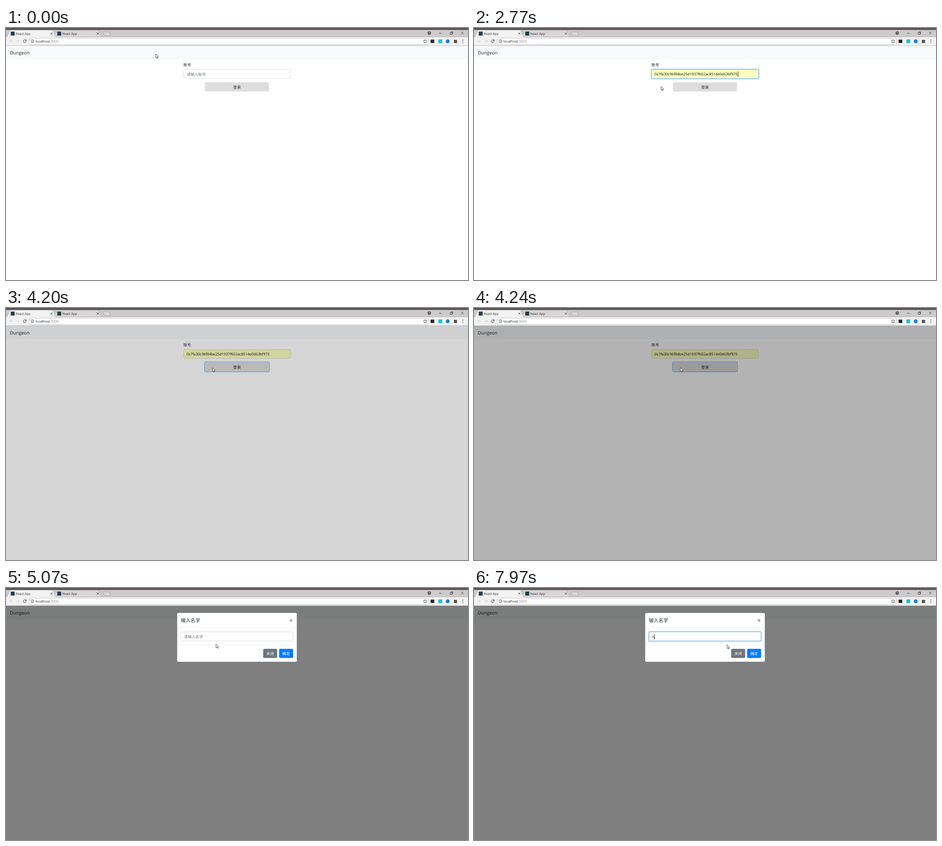
Write an HTML page that moves like this. It is 1013x553 px and loops after 8000 ms.

```html
<!DOCTYPE html>
<html lang="zh">
<head>
<meta charset="utf-8">
<title>React App</title>
<style>
  html, body { margin: 0; width: 100%; height: 100%; overflow: hidden; background: #fff; }
  svg { display: block; width: 1013px; height: 553px; }
  text { font-family: "Open Sans", "Noto Sans CJK SC", "Noto Sans CJK", sans-serif; font-size: 8.44px; fill: #212529; text-rendering: geometricPrecision; white-space: pre; }
  .tab { font-size: 6.8px; fill: #222; }
  .code { font-size: 7.95px; fill: #111; }
  .hint { fill: #6c757d; }
  .mid { text-anchor: middle; }
  .line { fill: none; stroke: #333; stroke-width: 1; }
  .field { fill: #fff; stroke: #ced4da; stroke-width: .8; }
  .ring { fill: none; stroke: #007bff; stroke-opacity: .27; stroke-width: 1.8; }
  .edge { fill: none; stroke: #80bdff; stroke-width: .9; }
</style>
</head>
<body>
<svg viewBox="0 0 1013 553">
  <!-- page -->
  <rect width="1013" height="553" fill="#fff"/>
  <rect y="39" width="1013" height="29.5" fill="#f8f9fa"/>
  <text x="8.4" y="58" style="font-size:10.1px">Dungeon</text>
  <text x="389" y="83.7">账号</text>
  <rect id="account" class="field" x="389.5" y="91.2" width="234.5" height="19.4" rx="2"/>
  <g id="accountFocus">
    <rect class="ring" x="388.3" y="90" width="236.9" height="21.8" rx="3"/>
    <rect class="edge" x="389.5" y="91.2" width="234.5" height="19.4" rx="2"/>
  </g>
  <text id="accountHint" class="hint" x="396" y="104.7">请输入账号</text>
  <text id="address" class="code" x="395.7" y="104.3">0x7fa30c96f84be25d1937f602ac8514e0d63bf975</text>
  <rect id="accountCaret" y="95.5" width="1" height="11.5" fill="#222"/>
  <rect x="436.2" y="119.2" width="140.5" height="20" rx="2" fill="#ddd"/>
  <rect id="loginFocus" x="435.3" y="118.3" width="142.3" height="21.8" rx="3" fill="none" stroke="#9cc6f7" stroke-width="1.6"/>
  <text class="mid" x="506.5" y="132.8">登录</text>

  <rect id="shade" y="39" width="1013" height="514"/>

  <g id="dialog">
    <rect x="375.2" y="54.5" width="262.6" height="107.5" rx="2.5" fill="#fff" stroke="#000" stroke-opacity=".2" stroke-width=".6"/>
    <text x="383.5" y="75" style="font-size:10.55px">输入名字</text>
    <path d="M622.6 68.6l4.8 4.8m0-4.8l-4.8 4.8" stroke="#777" stroke-width="1.4"/>
    <path d="M375.5 87.2h262M375.5 124.6h262" stroke="#e9ecef" stroke-width=".8"/>
    <rect class="field" x="383.9" y="96.4" width="245.4" height="19.7" rx="2"/>
    <g id="nameFocus">
      <rect class="ring" x="382.7" y="95.2" width="247.8" height="22.1" rx="3"/>
      <rect class="edge" x="383.9" y="96.4" width="245.4" height="19.7" rx="2"/>
    </g>
    <text id="nameHint" class="hint" x="390.3" y="109.8">请输入名字</text>
    <text id="name" class="code" x="390.4" y="109.6" style="fill:#495057">A</text>
    <rect id="nameCaret" y="101" width="1" height="11" fill="#333"/>
    <rect x="564" y="133.5" width="30.5" height="20" rx="2" fill="#6c757d"/>
    <rect x="599" y="133.5" width="30.5" height="20" rx="2" fill="#007bff"/>
    <text class="mid" x="579.3" y="146.8" style="fill:#fff">关闭</text>
    <text class="mid" x="614.2" y="146.8" style="fill:#fff">确定</text>
  </g>

  <!-- browser window -->
  <rect width="1013" height="20" fill="#cccaca"/>
  <rect width="1013" height="4.3" fill="#595455"/>
  <path d="M104 20L109.5 6.5Q110 5 112 5H201.500Q203.500 5 204 6.500L210 20Z" fill="#d8d6d6" stroke="#a3a1a1" stroke-width=".7"/>
  <path d="M212.500 8.500H226.500L230 16.800H216Z" fill="#d6d4d4" stroke="#a3a1a1" stroke-width=".7"/>
  <rect y="19.500" width="1013" height="19.500" fill="#f2f2f2"/>
  <path d="M0 19.500H2.500L8 6.500Q8.600 5 10.500 5H100Q102 5 102.600 6.500L108.500 19.500H1013" fill="none" stroke="#a9a7a7" stroke-width=".7"/>
  <path d="M2.500 20.500L8.300 6.600Q8.900 5.300 10.500 5.300H100Q101.700 5.300 102.300 6.600L108.300 20.500Z" fill="#f2f2f2"/>
  <path d="M0 38.700H1013" stroke="#b8b8b8" stroke-width=".9"/>
  <rect x="10.300" y="7.800" width="8.800" height="8.800" fill="#24404c"/>
  <rect x="112.300" y="7.800" width="8.800" height="8.800" fill="#24404c"/>
  <text class="tab" x="21.800" y="14.700">React App</text>
  <text class="tab" x="123.800" y="14.700">React App</text>
  <path class="line" d="M97.600 10.200l4 4m0-4l-4 4M199.400 10.200l4 4m0-4l-4 4"/>
  <rect x="51" y="22.300" width="875" height="14.200" rx="1.500" fill="#fff" stroke="#b9b9b9" stroke-width=".8"/>
  <path class="line" style="stroke:#ccc" d="M15.500 29H8.500m3.300-3.300L8.500 29l3.300 3.300M22.700 29h7m-3.300-3.300L29.700 29l-3.300 3.300"/>
  <path class="line" d="M43.800 27a3.300 3.300 0 1 0 .6 2.700"/>
  <path d="M44.700 25v3.400h-3.400z" fill="#333"/>
  <circle class="line" cx="58" cy="29" r="3.300" style="stroke-width:.8"/>
  <path class="line" d="M58 28.500v2.300M58 26.700v1"/>
  <text x="64.700" y="31.800" style="font-size:7.560px">localhost<tspan fill="#888">:3000</tspan></text>
  <path class="line" style="stroke-width:.8" d="M919 25.200l1.100 2.600 2.800.2-2.100 1.900.7 2.800-2.500-1.500-2.500 1.500.7-2.800-2.100-1.900 2.800-.2z"/>
  <rect x="931" y="25.500" width="8" height="7.300" fill="#222"/>
  <rect x="948" y="25" width="8.500" height="8.300" fill="#1fc3cf"/>
  <circle cx="968.500" cy="29.200" r="4.200" fill="#1c7fd6"/>
  <rect x="982" y="26" width="7" height="7" fill="#555"/>
  <g fill="#444">
    <circle cx="1001.700" cy="26" r=".9"/><circle cx="1001.700" cy="29.200" r=".9"/><circle cx="1001.700" cy="32.400" r=".9"/>
    <circle cx="928" cy="11" r="3.600"/>
  </g>
  <path d="M926 9.800h4v1.400h-4z" fill="#ccc"/>
  <path class="line" d="M949.500 11.500h5.500M974 10h4v4h-4zM975.500 10V8.500h4v4H978M998 8.600l5 5m0-5l-5 5" style="stroke-width:.9"/>

  <!-- pointer -->
  <path id="arrow" d="M0 0V8.300L1.900 6.600 3.300 9.700 4.700 9.100 3.400 6.100H5.900Z" fill="#fff" stroke="#111" stroke-width=".7"/>
  <path id="beam" class="line" style="stroke-width:.8" d="M-1.700-4.500H1.700M0-4.500V4.500M-1.700 4.500H1.700"/>
</svg>
<script>
const LOOP = 8000;
const $ = id => document.getElementById(id);
const ramp = (t, start, length = 150) => Math.min(1, Math.max(0, (t - start) / length));
const ease = p => p * p * (3 - 2 * p);
const show = (id, on) => $(id).setAttribute("opacity", Number(on));
const move = (id, x, y) => $(id).setAttribute("transform", `translate(${x} ${y})`);
const blink = age => age >= 0 && age % 1060 < 530;

// time, x, y of the pointer
const path = [
  [30, 328.4, 57], [830, 411, 101],
  [1150, 411, 101], [1470, 410.3, 118.8],
  [1770, 410.3, 118.8], [2270, 410.3, 127.8],
  [3200, 410.3, 127.8], [3420, 437, 134], [3600, 452.7, 131],
  [4670, 452.7, 131], [5070, 460.4, 122.8], [5310, 467, 106.3],
  [7740, 467, 106.3], [8010, 560, 125.5]
];

function pointer(t) {
  const i = path.findIndex(p => p[0] > t);
  if (i < 1) return path[0].slice(1);
  const [a, b] = [path[i - 1], path[i]];
  const p = ease(ramp(t, a[0], b[0] - a[0]));
  return [1, 2].map(k => a[k] + (b[k] - a[k]) * p);
}

function draw(t) {
  const filled = t >= 1830, chosen = t >= 2740, typed = t >= 6740;

  show("accountFocus", ease(ramp(t, 870)) - ease(ramp(t, 3840)));
  show("accountHint", !filled);
  show("address", filled);
  $("account").style.fill = filled ? "#faffbd" : "#fff";
  $("accountCaret").setAttribute("x", chosen ? 578.5 : 396);
  show("accountCaret", chosen ? t < 3270 : blink(t - 870));
  show("loginFocus", ease(ramp(t, 3840)));

  show("shade", ramp(t, 4152) / 2);
  show("dialog", ramp(t, 4441));
  move("dialog", 0, -26.8 * (1 - ramp(t, 4441, 300)) ** 1.7);

  show("nameFocus", ease(ramp(t, 5800)));
  show("nameHint", !typed);
  show("name", typed);
  $("nameCaret").setAttribute("x", typed ? 395.2 : 390);
  show("nameCaret", blink(t - (typed ? 6740 : 5810)));

  const [x, y] = pointer(t);
  const inAccount = t < 4000 && x > 389 && y > 91 && y < 111;
  const inName = t > 4600 && x > 384 && y > 96 && y < 116;
  const text = inAccount || inName;
  move("arrow", x, y);
  move("beam", x, y);
  show("arrow", !text);
  show("beam", text);
}

const start = performance.now();
function tick() {
  draw((performance.now() - start) % LOOP);
  requestAnimationFrame(tick);
}
tick();
</script>
</body>
</html>
```
